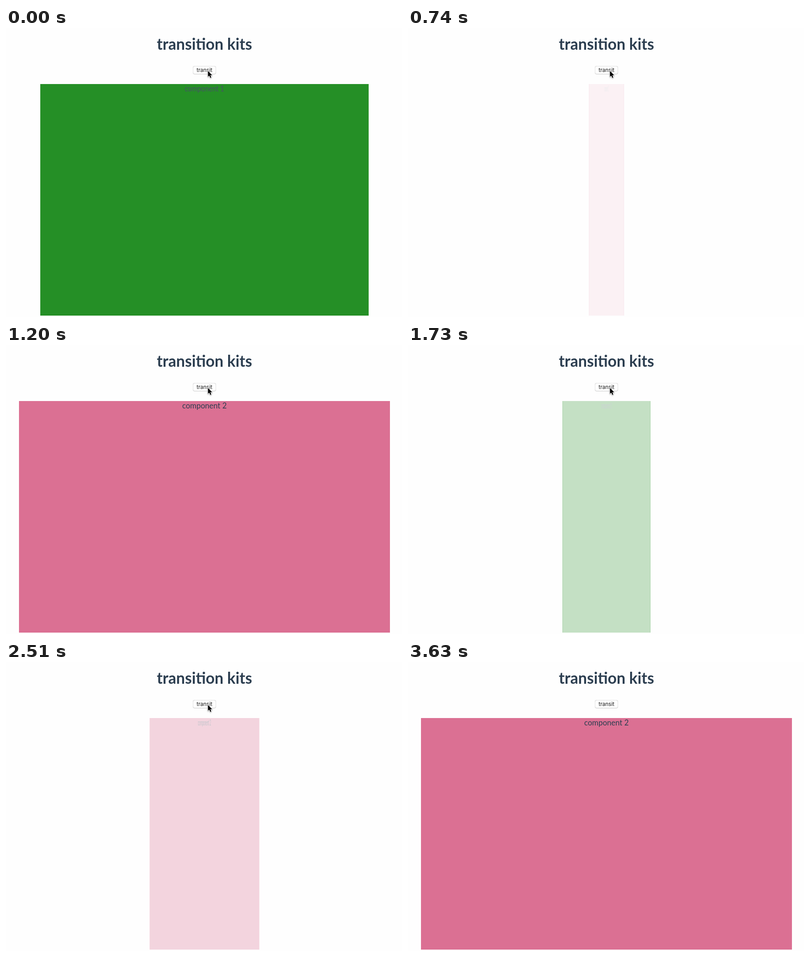
An HTML page with a canvas that plays this animation: 854 by 624 pixels, repeating every 4210 ms.

```html
<!DOCTYPE html>
<html lang="en">
<head>
<meta charset="utf-8">
<title>transition kits</title>
<style>
  html, body { margin: 0; width: 100%; height: 100%; overflow: hidden; background: #fefefe; }
  canvas { display: block; }
</style>
</head>
<body>
<canvas id="stage" width="854" height="624"></canvas>
<script>
const ctx = document.getElementById('stage').getContext('2d');
const LOOP = 4210;
const ENTER = 500;
const PAGE = '#fefefe';
const INK = '#2c3e50';
const CENTER = 428;
const PANEL = { y: 121, width: 800, height: 500 };

const first = { label: 'component 1', color: 'rgb(9,128,10)' };
const second = { label: 'component 2', color: 'rgb(219,112,147)' };

// Each panel replaces the previous one at `shown`; its easing began at `start`.
const entries = [
  { shown: 0, start: -300, view: first },
  { shown: 740, start: 690, view: second },
  { shown: 1730, start: 1643, view: first },
  { shown: 2510, start: 2410, view: second }
];

const ticks = [
  0, 90, 180, 260,
  740, 850, 940, 1020, 1110, 1200,
  1730, 1820, 1910, 2000, 2090, 2180,
  2510, 2600, 2690, 2810, 2910, 3010,
  3280, 3370, 3450, 3540, 3630
];

// Pointer path: time, x, y
const pointerPath = [
  [0, 435, 92], [2510, 435, 92], [2600, 444, 96], [2690, 471, 108],
  [2810, 600, 240], [2910, 742, 425], [3010, 833, 544],
  [3190, 833, 544], [3280, 833, 554], [3540, 831, 612], [3630, 831, 640]
];

const lastBefore = (list, test) => list.filter(test).pop();

// CSS "ease": cubic-bezier(.25, .1, .25, 1)
function ease(x) {
  if (x <= 0) return 0;
  if (x >= 1) return 1;
  const bezier = (u, a, b) => 3 * (1 - u) ** 2 * u * a + 3 * (1 - u) * u * u * b + u ** 3;
  let low = 0, high = 1;
  for (let i = 0; i < 24; i++) {
    const mid = (low + high) / 2;
    if (bezier(mid, 0.25, 0.25) < x) low = mid; else high = mid;
  }
  return bezier(low, 0.1, 1);
}

function text(label, x, baseline, font, color) {
  ctx.font = font;
  ctx.fillStyle = color;
  ctx.textAlign = 'center';
  ctx.fillText(label, x, baseline);
}

function drawButton() {
  ctx.beginPath();
  ctx.roundRect(403, 82, 50, 18, 4);
  ctx.fillStyle = '#c9c9c9';
  ctx.fill();
  ctx.beginPath();
  ctx.roundRect(403, 82, 50, 17, 4);
  ctx.fillStyle = '#e2e2e2';
  ctx.fill();
  ctx.beginPath();
  ctx.roundRect(404, 83, 48, 16, 3.5);
  ctx.fillStyle = '#fff';
  ctx.fill();
  text('transit', CENTER, 95, '11.5px Inter, sans-serif', '#1a1a1a');
}

function drawPanel(time) {
  const { start, view } = lastBefore(entries, e => e.shown <= time);
  const amount = ease((time - start) / ENTER);
  const { y, width, height } = PANEL;
  ctx.save();
  ctx.translate(CENTER, 0);
  ctx.scale(amount, 1);
  ctx.fillStyle = view.color;
  ctx.fillRect(-width / 2, y, width, height);
  text(view.label, 0, 137, '16.5px Lato, sans-serif', INK);
  // Fade the panel and its label together.
  ctx.globalAlpha = 1 - amount;
  ctx.fillStyle = PAGE;
  ctx.fillRect(-width / 2, y, width, height);
  ctx.restore();
}

function pointerAt(time) {
  const next = pointerPath.findIndex(p => p[0] > time);
  if (next < 0) return pointerPath[pointerPath.length - 1].slice(1);
  const [t0, x0, y0] = pointerPath[next - 1];
  const [t1, x1, y1] = pointerPath[next];
  const k = (time - t0) / (t1 - t0);
  return [x0 + (x1 - x0) * k, y0 + (y1 - y0) * k];
}

function drawPointer(time) {
  const arrow = new Path2D('M0.5 0.5V13.4L3.4 10.7L5.5 15.7L7.8 14.7L5.7 9.9H9.6Z');
  ctx.save();
  ctx.translate(...pointerAt(time));
  ctx.lineJoin = 'round';
  ctx.lineWidth = 2;
  ctx.strokeStyle = '#fff';
  ctx.shadowColor = 'rgba(0,0,0,.35)';
  ctx.shadowBlur = 2;
  ctx.shadowOffsetY = 1;
  ctx.stroke(arrow);
  ctx.shadowColor = 'transparent';
  ctx.fillStyle = '#000';
  ctx.fill(arrow);
  ctx.restore();
}

function draw(time) {
  ctx.fillStyle = PAGE;
  ctx.fillRect(0, 0, 854, 624);
  text('transition kits', CENTER, 46.5, 'bold 33.5px Lato, sans-serif', INK);
  drawButton();
  drawPanel(time);
  drawPointer(time);
}

const origin = performance.now();
function frame() {
  const now = (performance.now() - origin) % LOOP;
  draw(lastBefore(ticks, t => t <= now));
  requestAnimationFrame(frame);
}
frame();
</script>
</body>
</html>
```
